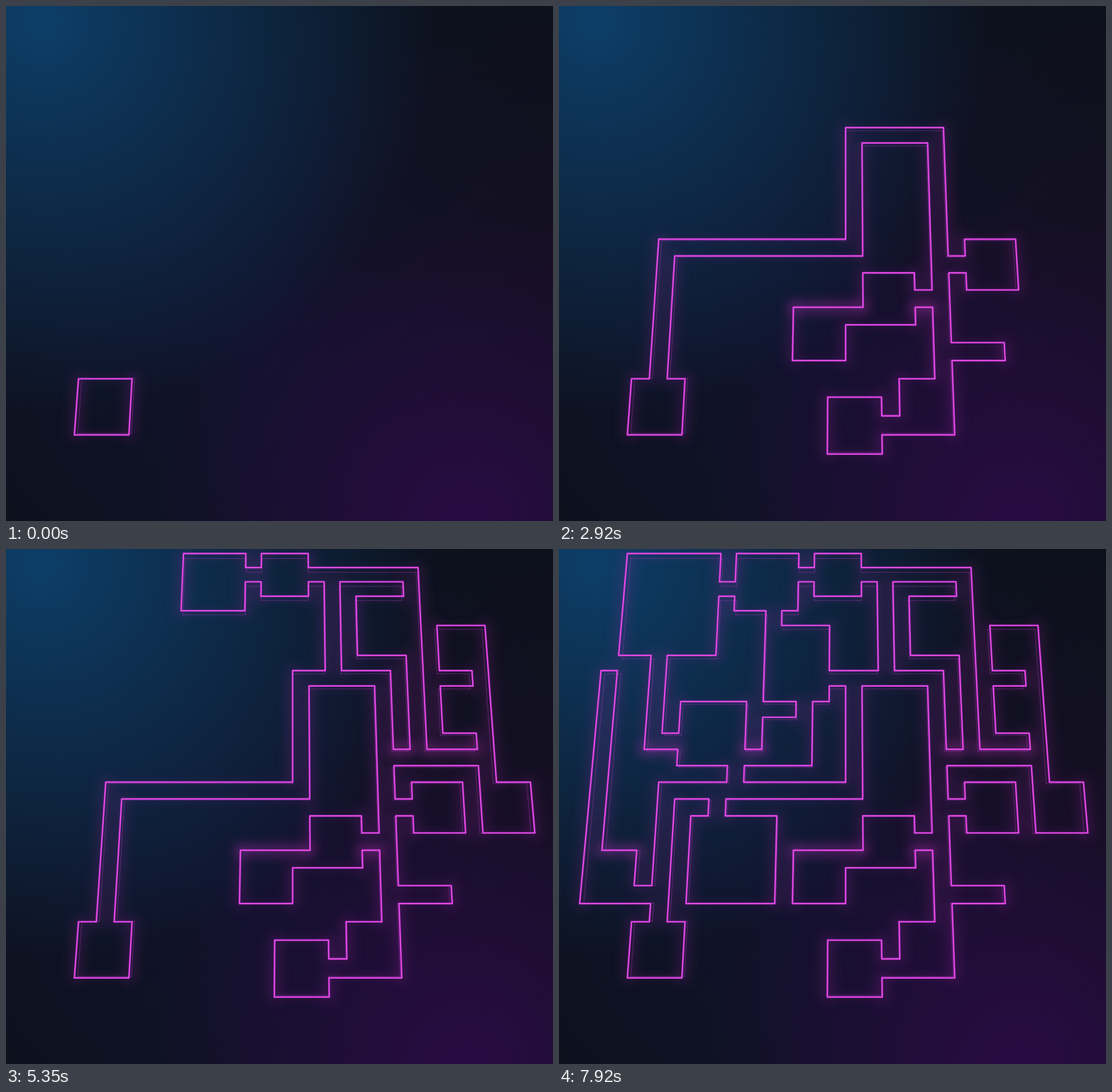
Animation of 771x726 px, one loop 8 s. Source, as an HTML page with a canvas:

```html
<!DOCTYPE html>
<html lang="en">
<head>
<meta charset="utf-8">
<title>Neon dungeon</title>
<style>
  html, body { margin: 0; width: 100%; height: 100%; overflow: hidden; }
  body {
    background:
      radial-gradient(circle 560px at 50px 20px, rgb(13, 62, 104), rgba(13, 62, 104, 0)),
      radial-gradient(circle 450px at 650px 740px, rgb(42, 11, 68), rgba(42, 11, 68, 0)),
      radial-gradient(circle 420px at 771px 380px, rgba(26, 14, 36, .6), rgba(26, 14, 36, 0)),
      radial-gradient(circle 520px at 360px 450px, rgba(19, 20, 52, .7), rgba(19, 20, 52, 0)),
      rgb(12, 17, 28);
  }
  canvas { display: block; }
</style>
</head>
<body>
<canvas id="stage" width="771" height="726"></canvas>
<script>
const ctx = document.getElementById('stage').getContext('2d');
const LOOP = 8000, FIRST = 488, PACE = 200.6;
const COLS = 30, ROWS = 28;

const block = (x, y, w = 1, h = 1, open = true) => ({ x, y, w, h, open });

// A square room with a one-cell door, `at` cells along the given side
function room(x, y, w, side, at = 1, h = w) {
  const doors = {
    N: [x + at, y - 1], S: [x + at, y + h],
    W: [x - 1, y + at], E: [x + w, y + at]
  };
  return [block(x, y, w, h), ...(side ? [block(...doors[side])] : [])];
}

// A corridor through corner points, one step per leg
function walk(...points) {
  return points.slice(1).map(([x, y], i) => {
    const [px, py] = points[i];
    return [block(Math.min(x, px), Math.min(y, py), Math.abs(x - px) + 1, Math.abs(y - py) + 1)];
  });
}

const [deadEnd] = walk([8, 4], [8, 8]);
const fill = pieces => pieces.map(p => ({ ...p, open: false }));

const steps = [
  room(3, 23, 3),
  ...walk([4, 22], [4, 15], [10, 15], [15, 15], [15, 8], [20, 8], [20, 25]),

  room(18, 23, 3),
  ...walk([21, 21], [23, 21]),
  [block(21, 16)],
  room(22, 15, 3, 'W'),
  room(16, 17, 3, 'E'),
  room(12, 19, 3, 'E', 0),
  room(14, 24, 3, 'E'),

  ...walk([21, 13], [26, 13]),
  room(26, 15, 3, 'N', 0),
  room(24, 9, 3, 'S', 2),
  room(24, 5, 3, 'S', 2),
  ...walk([17, 7], [17, 1], [22, 1], [22, 13]),

  room(19, 3, 3, 'E', 0, 4),
  [block(16, 1)],
  room(13, 0, 3, 'E'),
  [block(12, 1)],
  room(8, 0, 4, 'E'),

  [block(7, 2)],
  room(1, 0, 6, 'E', 2, 7),
  ...walk([3, 7], [3, 12]),
  room(5, 10, 4, 'W', 2),
  room(10, 11, 3, 'W', 2),
  room(10, 5, 4, 'S', 2, 5),
  [block(10, 4)],
  deadEnd,

  room(6, 17, 5, 'N'),
  room(0, 19, 3, 'E', 2),
  [block(8, 14)],
  ...walk([0, 18], [0, 8]),
  [block(14, 8), ...fill(deadEnd)]
];

// Perspective: depth 0 is the wall top, depth 1 its foot
function project(x, y, depth) {
  const k = 1 - .0055 * y, sink = depth * .0155;
  const px = 404 + (x - 15) * 21.97 / k;
  const py = (6.4 + 19.68 * y) / k;
  return [px + (404 - px) * sink, py + (460 - py) * sink];
}

// Walls run wherever floor meets solid ground
function wallsAt(step) {
  const floor = new Set(), key = (x, y) => x + ',' + y;
  for (const { x, y, w, h, open } of steps.slice(0, step + 1).flat())
    for (let j = y; j < y + h; j++)
      for (let i = x; i < x + w; i++)
        open ? floor.add(key(i, j)) : floor.delete(key(i, j));
  const has = (x, y) => floor.has(key(x, y));
  const walls = [];
  for (let y = 0; y <= ROWS; y++)
    for (let x = 0; x <= COLS; x++) {
      if (has(x, y) !== has(x - 1, y)) walls.push([x, y, x, y + 1]);
      if (has(x, y) !== has(x, y - 1)) walls.push([x, y, x + 1, y]);
    }
  return walls;
}

function stroke(walls, color, width, depth = 0, blur = 0) {
  ctx.filter = blur ? `blur(${blur}px)` : 'none';
  ctx.strokeStyle = color;
  ctx.lineWidth = width;
  ctx.beginPath();
  for (const [ax, ay, bx, by] of walls) {
    ctx.moveTo(...project(ax, ay, depth));
    ctx.lineTo(...project(bx, by, depth));
  }
  ctx.stroke();
}

const upright = ([ax, , bx]) => ax === bx;
const lit = ([, ay, , by]) => ay === by && (ay === 13 || ay === 19);

function draw(step) {
  const walls = wallsAt(step);
  ctx.clearRect(0, 0, 771, 726);
  ctx.lineCap = 'round';
  stroke(walls, 'rgba(200, 50, 200, .07)', 12, .4, 6);
  stroke(walls.filter(upright), 'rgba(215, 60, 205, .1)', 20, .2, 9);
  stroke(walls.filter(lit), 'rgba(215, 60, 205, .24)', 18, 0, 8);
  stroke(walls, 'rgba(165, 60, 185, .38)', 1, 1);
  stroke(walls, 'rgba(160, 40, 190, .6)', 3);
  stroke(walls, 'rgb(236, 78, 232)', 1.7);
}

let shown = -1;
function tick() {
  const t = performance.now() % LOOP;
  const step = Math.min(steps.length - 1, Math.max(0, Math.floor((t - FIRST) / PACE) + 1));
  if (step !== shown) draw(shown = step);
  requestAnimationFrame(tick);
}
tick();
</script>
</body>
</html>
```
